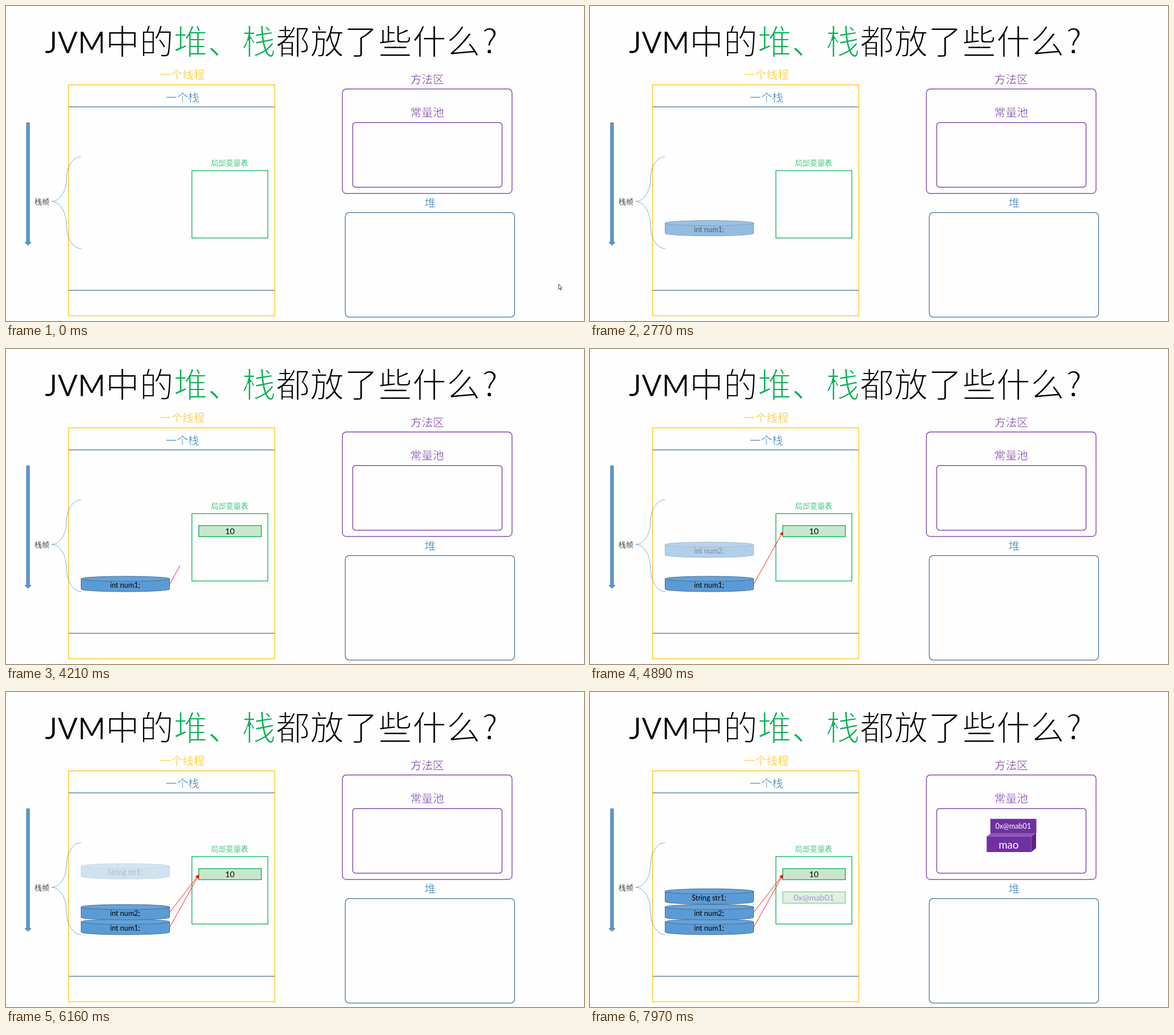
An HTML page that plays this animation: 1012 px wide and 553 px high, repeating every 8000 ms.

```html
<!DOCTYPE html>
<html lang="zh-CN">
<head>
<meta charset="utf-8">
<title>JVM 堆与栈</title>
<style>
  html, body { margin: 0; width: 100%; height: 100%; overflow: hidden; background: #fefefe; }
  svg { display: block; width: 100%; height: 100%; }
  text { font-family: Lato, "Noto Sans CJK SC", "Noto Sans CJK", sans-serif; }
  /* A background-coloured outline thins the strokes of the regular weight. */
  .cjk { font-family: "Noto Sans CJK SC", "Noto Sans CJK", sans-serif; font-weight: 300; stroke: #fefefe; stroke-width: .5; }
  .mid { text-anchor: middle; }
  .title { font-size: 59.7px; stroke-width: 1.9; }
  .latin { font-size: 52.5px; stroke: #fefefe; stroke-width: .7; }
  .head { font-size: 19.6px; }
  .small { font-size: 13px; stroke-width: .25; }
  .code { font-size: 12.6px; }
  .cell { font-size: 14.3px; }
  .box { fill: none; stroke-width: 1.25; }
  .brace { stroke: #5b9bd5; stroke-width: .8; }
  .can { fill: #5b9bd5; stroke: #41719c; }
  .slot { fill: #c8e6cc; stroke: #00b050; stroke-width: 1.3; }
  .link { fill: red; stroke: red; stroke-width: .9; }
</style>
</head>
<body>
<svg viewBox="0 0 1012 553" preserveAspectRatio="none">
  <defs>
    <clipPath id="wipe1"><rect x="284" y="300" width="0" height="120"/></clipPath>
    <clipPath id="wipe2"><rect x="284" y="300" width="0" height="120"/></clipPath>
    <clipPath id="bars"><path d=""/></clipPath>
    <g id="can">
      <path class="can" d="M131.5 4.5V22.5A77.5 4.5 0 0 0 286.5 22.5V4.5Z"/>
      <ellipse class="can" cx="209" cy="4.5" rx="77.5" ry="4.5" style="fill:#67a2d8"/>
    </g>
  </defs>

  <text class="latin" x="68" y="83">JVM</text>
  <text class="cjk title" x="174" y="84.5">中的<tspan fill="#00b050">堆、栈</tspan>都放了些什么</text>
  <text class="cjk title" x="833" y="83">?</text>

  <g class="mid head">
    <text class="cjk" x="309" y="128" fill="#ffc000">一个线程</text>
    <text class="cjk" x="309" y="168" fill="#2e75b6">一个栈</text>
    <text class="cjk" x="737.5" y="136" fill="#7030a0">方法区</text>
    <text class="cjk" x="737.5" y="194" fill="#7030a0">常量池</text>
    <text class="cjk" x="742.5" y="353" fill="#2e75b6">堆</text>
  </g>
  <text class="cjk mid small" x="391.5" y="280" fill="#00b050">局部变量表</text>
  <text class="cjk mid small" x="63" y="348">栈帧</text>

  <g class="box">
    <rect x="109.5" y="138.5" width="361" height="405.3" stroke="#ffc000"/>
    <path d="M110 177H470M110 499H470" stroke="#41719c"/>
    <rect x="325.5" y="289" width="133" height="118.3" stroke="#00b050"/>
    <rect x="589" y="145.5" width="297" height="183.7" rx="7" stroke="#7030a0"/>
    <rect x="607" y="204.5" width="261.5" height="113.5" rx="5" stroke="#7030a0"/>
    <rect x="594" y="362.5" width="296.5" height="183.5" rx="7" stroke="#41719c"/>
    <path class="brace" d="M131.5 264.5A25.7 39.3 0 0 0 105.8 303.8A25.7 39.3 0 0 1 80 343A25.7 41.5 0 0 1 105.8 384.5A25.7 41.5 0 0 0 131.5 426"/>
  </g>
  <path class="can" d="M36 205H41V415H43.8L38.5 420L33.2 415H36Z"/>
  <path id="cursor" d="M967.7 488.5V497.3L969.7 495.5L971.2 498.8L972.4 498.2L970.9 495H973.6Z" fill="#fff" stroke="#333" stroke-width=".9"/>

  <g id="num1"><use href="#can"/><text class="mid code" x="208.5" y="20">int num1;</text></g>
  <g id="num2"><use href="#can"/><text class="mid code" x="208.5" y="20">int num2;</text></g>
  <g id="str1"><use href="#can"/><text class="mid code" x="208.5" y="20">String str1;</text></g>
  <g id="ten">
    <rect class="slot" x="337.5" y=".5" width="109.5" height="19.5"/>
    <text class="mid cell" x="392" y="15.5">10</text>
  </g>
  <g id="ref">
    <rect class="slot" x="337.5" y=".5" width="109.5" height="20"/>
    <text class="mid cell" x="392" y="15.5" fill="#7030a0">0x@mab01</text>
  </g>
  <g class="link" clip-path="url(#wipe1)">
    <path d="M286.5 413L336 324"/><path d="M338 320.3L337.4 327.6L332.2 324.7Z" stroke="none"/>
  </g>
  <g class="link" clip-path="url(#wipe2)">
    <path d="M286.5 387L335.5 323.5"/><path d="M338 320.3L336.3 327.4L331.6 323.8Z" stroke="none"/>
  </g>

  <g clip-path="url(#bars)" fill="#7030a0">
    <rect x="701" y="222.7" width="80.5" height="25.5"/>
    <path d="M694.5 253.5L702.5 247.7H781L772.5 253.5Z" fill="#8c59b3"/>
    <path d="M772.5 253.5L781 247.7V274L772.5 281Z" fill="#5a2680"/>
    <rect x="694.5" y="253.5" width="78" height="27.5"/>
    <text class="mid code" x="741" y="239.5" fill="#fff">0x@mab01</text>
    <text class="mid" x="733" y="274.5" font-size="18.6" fill="#fff">mao</text>
  </g>
</svg>
<script>
const LOOP = 8000, FIRST = 2230, STEP = 140, DRIFT = 55.3;
const find = selector => document.querySelector(selector);
const progress = (t, start, length) => Math.min(1, Math.max(0, (t - start) / length));

// Fade in while drifting to the resting height; dir -1 comes from above, 1 from below.
const floats = [
  ['#num1', 2115, 900, 399, -1],
  ['#ten', 3005, 1000, 309.5, 1],
  ['#num2', 4505, 1000, 373, -1],
  ['#str1', 5950, 1000, 345.5, -1],
  ['#ref', 7500, 1000, 321, 1],
].map(([id, ...rest]) => [find(id), ...rest]);

const wipes = [['#wipe1 rect', 4005, 500], ['#wipe2 rect', 5505, 450]]
  .map(([id, ...rest]) => [find(id), ...rest]);

const cursor = find('#cursor');
const bars = find('#bars path');
const noise = n => { const v = Math.sin(n * 12.9898) * 43758.5453; return v - Math.floor(v); };

function barRows(amount) {
  let d = '';
  for (let y = 222; y < 282; y++) {
    if (noise(y) < amount) d += `M690 ${y}h96v1h-96z`;
  }
  return d;
}

function draw(time) {
  const t = time < FIRST ? 0 : FIRST + STEP * Math.floor((time - FIRST + 1) / STEP);
  cursor.style.display = time < 1270 ? '' : 'none';
  for (const [el, start, length, y, dir] of floats) {
    const p = progress(t, start, length);
    el.setAttribute('transform', `translate(0 ${y + dir * DRIFT * (1 - p)})`);
    el.setAttribute('opacity', p ** .8);
  }
  for (const [el, start, length] of wipes) {
    el.setAttribute('width', 56 * progress(t, start, length));
  }
  bars.setAttribute('d', barRows(Math.sqrt(progress(t, 6900, 500))));
}

const begin = performance.now();
function tick() {
  draw((performance.now() - begin) % LOOP);
  requestAnimationFrame(tick);
}
tick();
</script>
</body>
</html>
```
